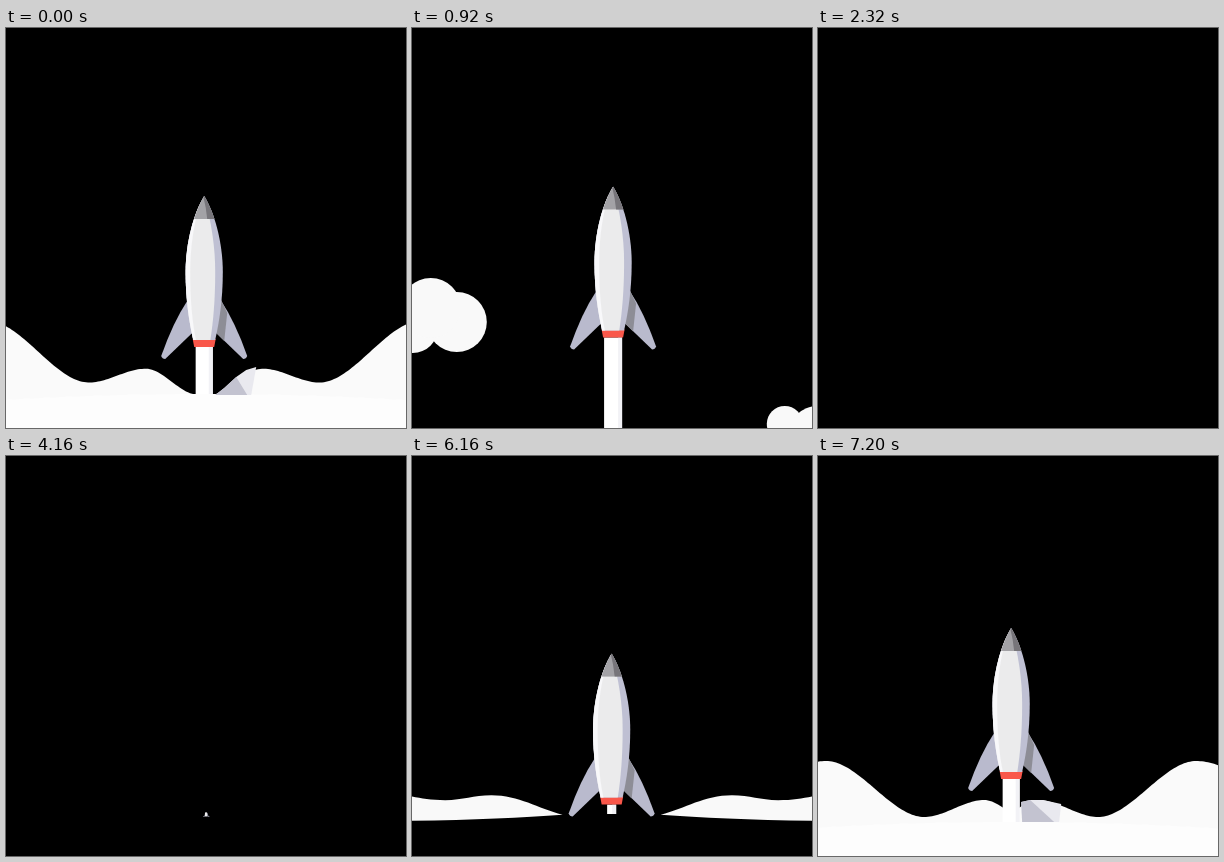
An HTML page with a canvas that plays this animation: 400x400 px, repeating every 7.24 s.

```html
<!DOCTYPE html>
<html lang="en">
<head>
<meta charset="utf-8">
<title>Rocket launch</title>
<style>
html, body { margin: 0; width: 100%; height: 100%; overflow: hidden; background: #000; }
canvas { display: block; width: 400px; height: 400px; }
</style>
</head>
<body>
<canvas id="stage" width="400" height="400"></canvas>
<script>
const ctx = document.getElementById('stage').getContext('2d');
const LOOP = 7240, STEP = 40, IGNITION = 5520, LIFTOFF = 1720, CENTER = 200.3;

const clamp = (v, a = 0, b = 1) => Math.min(b, Math.max(a, v));
const lerp = (a, b, p) => a + (b - a) * p;
const ramp = (t, a, b) => clamp((t - a) / (b - a));
const smooth = p => p * p * (3 - 2 * p);
const easeOut = p => 1 - (1 - p) ** 3;

// Smooth curve through [position, value] pairs, flat at every extreme
function track(keys, t) {
  if (t <= keys[0][0]) return keys[0][1];
  const last = keys.length - 1;
  if (t >= keys[last][0]) return keys[last][1];
  const i = keys.findIndex(k => k[0] > t) - 1;
  const slope = n => (keys[n + 1][1] - keys[n][1]) / (keys[n + 1][0] - keys[n][0]);
  const tangent = n => {
    if (n === 0 || n === last) return 0;
    const a = slope(n - 1), b = slope(n);
    return a * b > 0 ? 2 * a * b / (a + b) : 0;
  };
  const [t0, v0] = keys[i], [t1, v1] = keys[i + 1];
  const d = t1 - t0, p = (t - t0) / d, q = 1 - p;
  return v0 * (1 + 2 * p) * q * q + tangent(i) * d * p * q * q
       + v1 * p * p * (3 - 2 * p) - tangent(i + 1) * d * p * p * q;
}

function fillPath(d, color) {
  ctx.fillStyle = color;
  ctx.fill(new Path2D(d));
}

function fillPoly(points, color) {
  ctx.fillStyle = color;
  ctx.beginPath();
  points.forEach(([x, y]) => ctx.lineTo(x, y));
  ctx.fill();
}

function rect(x, y, w, h, color) {
  ctx.fillStyle = color;
  ctx.fillRect(x, y, w, h);
}

const HULL = 'M0 0C-10 16-18.6 46-18.6 76C-18.6 104-15 126-11 144H11C15 126 18.6 104 18.6 76C18.6 46 10 16 0 0Z';

// Local origin is the nose; the fins end at y = 163
function rocket(x, y, hot, sx = 1, sy = 1) {
  ctx.save();
  ctx.translate(x, y);
  ctx.scale(sx, sy);
  fillPath('M-17 105Q-31 126-43 160Q-42 163-39 163L-12 137Z', '#b9bacd');
  fillPath('M17 105Q31 126 43 160Q42 163 39 163L12 137Z', '#b9bacd');
  fillPath('M16 102L23 117L20 145L12 137Z', '#8d8d96');
  fillPath('M-11.5 143H11.5L10 151H-10Z', hot ? '#f9574a' : '#77757a');
  if (!hot) fillPath('M3 143H11.5L10 151H3Z', '#646268');
  ctx.save();
  ctx.clip(new Path2D(HULL));
  rect(-20, 0, 40, 145, '#bfc0d3');
  fillPath('M-20 0H0C7 26 11 50 11 76C11 104 9 126 6 145H-20Z', '#ebebec');
  fillPath('M-20 0H-2C-10 24-14 50-14 76C-14 104-12 126-8 145H-20Z', '#f8f8fa');
  rect(-20, 0, 40, 23, '#a3a2a6');
  fillPath('M-1 0Q2 12 3 23H20V0Z', '#77757a');
  ctx.restore();
  ctx.restore();
}

// Launch time runs on from ignition through the loop point
const CLIMB = [[0, 198], [720, 197.5], [1120, 193], [1480, 186], [1680, 172],
               [LIFTOFF, 168], [1860, 161], [2240, 161]];

const noseY = t => track(CLIMB, t) - 1.83e-7 * Math.max(0, t - 2400) ** 3;

function shake(t) {
  const size = 7.2 * ramp(t, 300, 1100) * (1 - ramp(t, LIFTOFF, 2760));
  return -size * Math.cos(2 * Math.PI * (t - 1676) / 216.54);
}

// Low puffs that roll away to both sides
function puffs(t, cx) {
  const p = ramp(t, 0, 1120), out = easeOut(p);
  const sx = lerp(0.047, 1, out), sy = lerp(0.22, 1, smooth(p));
  const slide = 330 * ramp(t, 1120, 1560) ** 1.3;
  const base = lerp(361, 357, p);
  for (const side of [-1, 1]) {
    const X = u => cx + side * (u * sx + slide);
    const Y = h => base - h * sy;
    ctx.beginPath();
    ctx.moveTo(X(53), Y(0));
    ctx.bezierCurveTo(X(80), Y(9), X(100), Y(28), X(130), Y(28));
    ctx.bezierCurveTo(X(150), Y(28), X(160), Y(21), X(180), Y(21));
    ctx.bezierCurveTo(X(215), Y(21), X(225), Y(34), X(260), Y(32));
    ctx.bezierCurveTo(X(300), Y(30), X(310), Y(0), X(330), Y(-10));
    ctx.quadraticCurveTo(X(150), Y(-10), X(53), Y(0));
    ctx.fillStyle = '#f9f9f9';
    ctx.fill();
  }
}

// Crests and troughs of the big smoke, running outward as one piece
const WAVE = [[-190, 24], [-130, 4], [-80, 22], [-22, 0], [27, 23], [87, 6],
              [185, 62], [300, 18], [410, 55], [540, 15]];

function waveHeight(u, t) {
  const age = t - 1680;
  return track(WAVE, u - 0.75 * age) + 0.0014 * u * clamp(age, 0, 120);
}

function smoke(t, cx, drop) {
  const grow = smooth(ramp(t, 1240, 1600));
  if (!grow || drop > 140) return;
  const sink = (1 - grow) * 45 + drop;
  const surface = (color, height) => {
    ctx.fillStyle = color;
    ctx.beginPath();
    ctx.moveTo(0, 400);
    for (let x = 0; x <= 400; x += 2) ctx.lineTo(x, height(Math.abs(x - cx)) + sink);
    ctx.lineTo(400, 400);
    ctx.fill();
  };
  surface('#fafafa', u => 367 - grow * waveHeight(u, t));
  surface('#fdfdfd', u => 366 + 6 * (u / 200) ** 2);
  if (t >= 1640) shadow(t, cx, drop);
}

function shadow(t, cx, drop) {
  const s = ramp(t, 1680, LIFTOFF);
  const at = (x0, y0, x1, y1) => [cx + lerp(x0, x1, s), lerp(y0, y1, s) + drop];
  const left = at(11, 366, 11, 367), crest = at(19, 344, 32, 349);
  fillPoly([left, at(10, 346, 20, 360), crest, at(32, 344, 42, 342),
            at(50, 348, 52, 339), at(48, 366, 47, 367)], '#e9e9ef');
  fillPoly([left, at(10, 346, 20, 360), crest, at(43, 366, 43, 367)], '#c3c3d0');
}

function trail(t, cx, top, drop) {
  let w = track([[0, 4], [1120, 14], [1680, 17], [2240, 18]], t);
  if (t >= 3600) w = Math.max(1, Math.round(18 * (1 - ramp(t, 3600, 3960))));
  if (t >= 4040) return;
  const bottom = Math.min(400, lerp(358, 366, ramp(t, 1120, 1680)) + drop);
  const y = Math.max(0, top);
  const x = t >= 3960 ? 199 : cx - w / 2;
  rect(x, y, w, bottom - y, '#fff');
  if (w > 8) rect(x + w - 4, y, 4, bottom - y, '#f2f2f6');
}

const CLOUDS = [[372, 76, 18], [405, 88, 30], [0, -20, 25], [44, -26, 30], [18, -40, 30]];

function sky(t, dx) {
  const d = t - 2240;
  ctx.fillStyle = '#f9f9f9';
  if (d > -400 && d < 700) {
    const fall = 0.6 * d + 0.0005 * d * d;
    for (const [x, y, r] of CLOUDS) {
      ctx.beginPath();
      ctx.arc(x + dx, y + fall, r, 0, 7);
      ctx.fill();
    }
  }
  const y = 40 + 1.8 * (t - 3040);
  if (y > -202 && y < 400) {
    ctx.beginPath();
    ctx.roundRect(9, y, 45, 201, 22.5);
    ctx.fill();
  }
}

function launch(t) {
  const dx = shake(t), cx = CENTER + dx;
  const y = noseY(t);
  const drop = 0.0008 * Math.max(0, t - LIFTOFF) ** 2;
  sky(t, dx);
  if (t < 1600) puffs(t, cx);
  smoke(t, cx, drop);
  trail(t, cx, y + 151, drop);
  if (y > -170) rocket(cx, y, t >= 240);
}

function popUp(t) {
  const sx = track([[4160, 0.08], [4440, 1.5], [4680, 0.9], [4880, 1]], t);
  const sy = lerp(0.03, 1, easeOut(ramp(t, 4160, 4760)));
  rocket(CENTER, 361 - 163 * sy, false, sx, sy);
}

function draw(t) {
  rect(0, 0, 400, 400, '#000');
  if (t >= IGNITION) launch(t - IGNITION);
  else if (t < 2320) launch(t + LOOP - IGNITION);
  else if (t >= 4160) popUp(t);
}

let start;
function tick(now) {
  start ??= now;
  draw(Math.floor(((now - start) % LOOP) / STEP) * STEP);
  requestAnimationFrame(tick);
}
draw(0);
requestAnimationFrame(tick);
</script>
</body>
</html>
```
